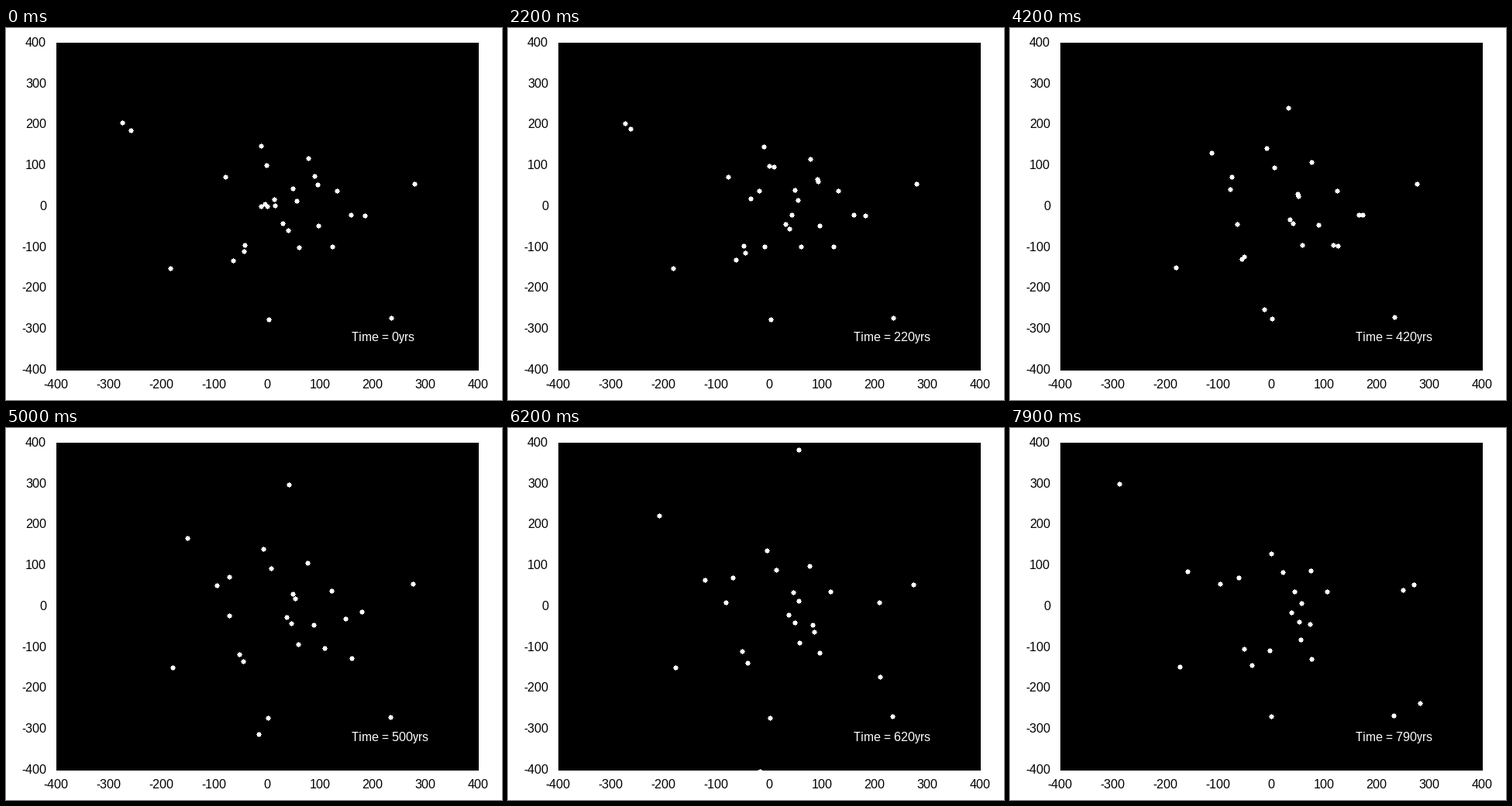
Recreate the animation shown at these times as a matplotlib script. Size 640 px wide and 480 px high, loop 8 s.

```python
import numpy as np
import matplotlib.pyplot as plt
from matplotlib.animation import FuncAnimation
from matplotlib.collections import PolyCollection
from matplotlib.patches import Rectangle

W, H = 640, 480
FRAMES, STEP = 80, 100
END = (FRAMES - 1) * STEP / 1000
LEFT, TOP, RIGHT, BOTTOM = 65, 19, 610, 442
FONT = 16 * 72 / 100  # 16 px at 100 dpi

plt.rcParams.update({"font.family": "Liberation Sans",
                     "text.hinting": "default", "text.hinting_factor": 1})


def drift(x, y, dx, dy):
    """Start at rest, then fall with constant acceleration."""
    start, move = np.array([x, y]), np.array([dx, dy])
    return lambda t: start + move * (t / END) ** 2


def meet(time, hit, *tracks, power=1):
    """Stars in free fall towards one point, then flung from it to their ends.

    A power below 1 slows the way out, as for stars still bound together."""
    hit = np.array(hit)

    def star(start, end):
        def at(t):
            if t < time:
                return hit + (start - hit) * (1 - (t / time) ** 2) ** (2 / 3)
            return hit + (end - hit) * ((t - time) / (END - time)) ** power
        return at

    return [star(np.array(a), np.array(b)) for a, b in tracks]


stars = [
    drift(283, 192, 12, 1), drift(329, 152, 8, 10), drift(336, 177, 16, 9),
    drift(390, 168, -2, 16), drift(427, 210, -18, 1), drift(378, 283, -3, -10),
    drift(403, 255, -16, -2), drift(527, 201, -6, 1), drift(497, 374, -2, -3),
    drift(339, 376, -2, -4), drift(212, 310, 7, -2),

    # the central triple breaks up
    *meet(0.88, (332.5, 228.5), ((334, 227), (388, -36)),
          ((329, 230), (229, 185)), ((337, 230), (322, 512))),

    # close pairs fling each other away
    *meet(1.5, (346, 226.5), ((346, 221), (141, 72)), ((347, 229), (529, 355))),
    *meet(1.85, (306.5, 286), ((308, 280), (271, 201))),
    *meet(4.2, (417, 280), ((421, 282), (389, 298))),
    *meet(4.6, (452, 240.8), ((445, 241), (335, 287)), ((463, 242), (507, 209))),

    # collisions that throw both stars far off the stage at once
    *meet(2.35, (399.5, 196.5), ((398, 191), (60000, 0)), ((402, 202), (-60000, 0))),
    *meet(3.35, (153, 125.5), ((150, 122), (40000, 11500)),
          ((161, 132), (-40000, -11500))),

    # bound pairs swing past each other
    *meet(3.4, (360, 254), ((357, 252), (373, 250)), ((364, 261), (363, 238)), power=0.5),
    *meet(4.35, (371.5, 215.5), ((370, 207), (376, 226)), ((375, 223), (367, 211)), power=0.5),
    *meet(4.4, (301, 297), ((293, 300), (312, 306)), ((307, 288), (302, 285)), power=0.5),
]

# 5 px square with a 1 px nub on each side
side = np.array([(2.5, -2.5), (2.5, -0.5), (3.5, -0.5), (3.5, 0.5), (2.5, 0.5)])
turn = np.array([[0, 1], [-1, 0]])
dot = np.vstack([side @ np.linalg.matrix_power(turn, k) for k in range(4)])

fig = plt.figure(figsize=(W / 100, H / 100), dpi=100, facecolor="white")
ax = fig.add_axes([0, 0, 1, 1])
ax.set(xlim=(0, W), ylim=(H, 0))
ax.axis("off")
sky = Rectangle((LEFT, TOP), RIGHT - LEFT, BOTTOM - TOP, fc="black", ec="none", lw=0)
ax.add_patch(sky)

for k, value in enumerate(range(-400, 401, 100)):
    ax.text(64.5 + 68.1 * k, 465, str(value), ha="center", size=FONT)
    ax.text(52, round(446 - 52.76 * k), str(value), ha="right", size=FONT)

clock = ax.text(446, 404, "", color="white", size=FONT)
dots = PolyCollection([], facecolors="white", edgecolors="none",
                      linewidths=0, antialiaseds=False)
ax.add_collection(dots, autolim=False)
dots.set_clip_path(sky)


def draw(i):
    t = i * STEP / 1000
    dots.set_verts([dot + np.round(star(t)) + 0.5 for star in stars])
    clock.set_text(f"Time = {10 * i}yrs")
    return dots, clock


anim = FuncAnimation(fig, draw, frames=FRAMES, interval=STEP, repeat=True, repeat_delay=0)
plt.show()
```
